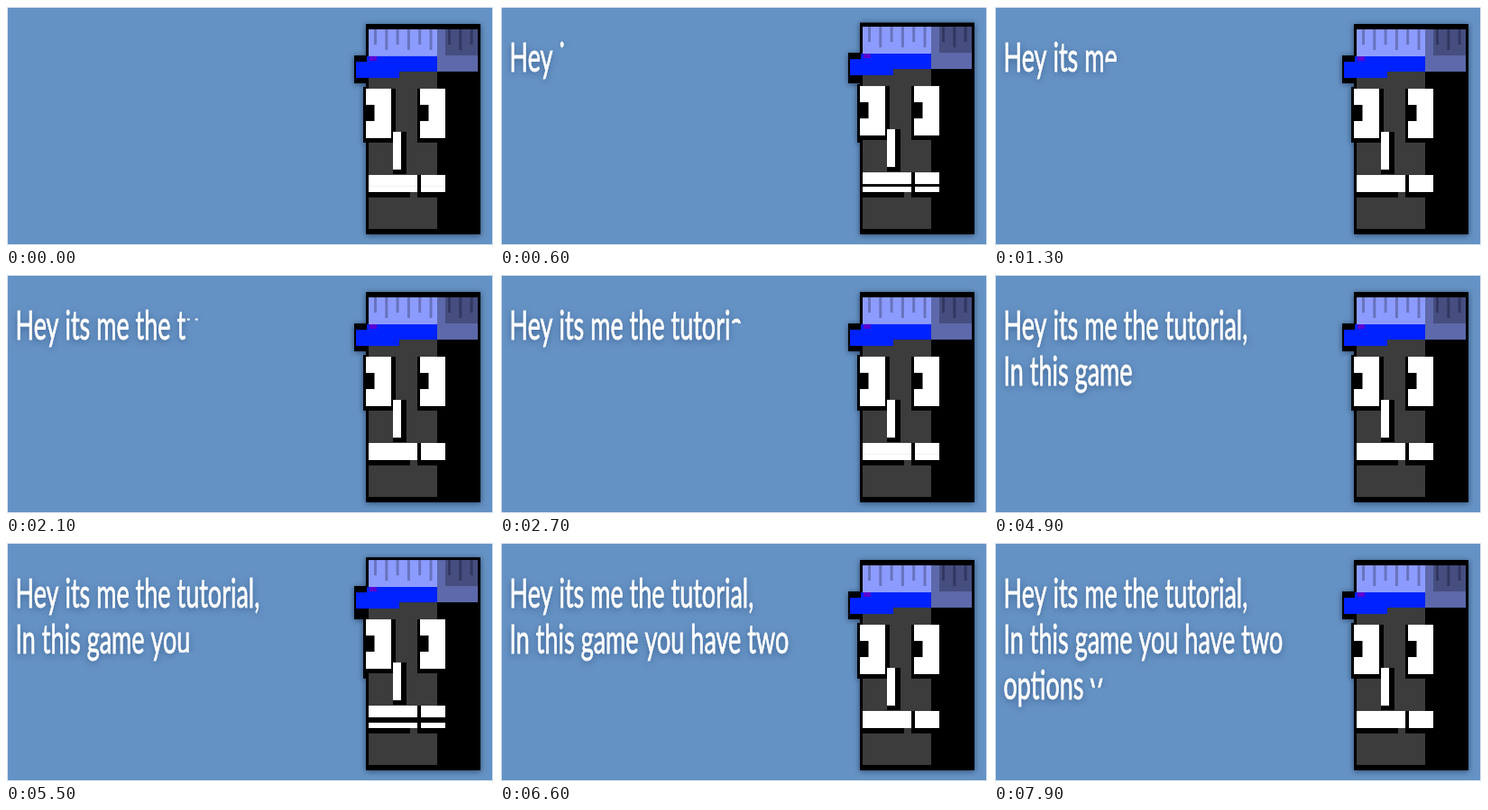
An HTML page with a canvas that plays this animation: 541x267 px, repeating every 8000 ms.

```html
<!DOCTYPE html>
<html>
<head>
<meta charset="utf-8">
<style>
  html, body { margin: 0; width: 100%; height: 100%; overflow: hidden; background: #fff; }
  canvas { display: block; }
</style>
</head>
<body>
<canvas id="stage" width="541" height="267"></canvas>
<script>
const ctx = document.getElementById('stage').getContext('2d');
const LOOP = 8000;
const LINES = ['Hey its me the tutorial,', 'In this game you have two', 'options you'];
const CONDENSE = 0.6;

// [time, letters typed]: speech pauses after the first line
const PACE = [[50, 0], [1300, 9.5], [2700, 21.35], [3100, 24], [3550, 24],
  [4000, 30.3], [5500, 39.7], [6580, 49], [6700, 49], [7900, 57.45], [8000, 58.1]];

function typedAt(t) {
  if (t <= PACE[0][0]) return 0;
  const i = PACE.findIndex(p => p[0] >= t);
  const [t0, n0] = PACE[i - 1], [t1, n1] = PACE[i];
  return n0 + (n1 - n0) * (t - t0) / (t1 - t0);
}

// Mouth opening, 0 to 1, in short beats
function talkAt(t) {
  const phase = t % 450;
  return Math.max(0, 1 - Math.abs(phase - 100) / 100);
}

function box(color, x0, y0, x1, y1) {
  ctx.fillStyle = color;
  ctx.fillRect(x0, y0, x1 - x0, y1 - y0);
}

function shadow(color, blur, dy) {
  ctx.shadowColor = color;
  ctx.shadowBlur = blur;
  ctx.shadowOffsetY = dy;
}

function drawLetters(text, x, y) {
  ctx.save();
  ctx.translate(x, y);
  ctx.scale(CONDENSE, 1);
  ctx.fillStyle = ctx.strokeStyle = '#fff';
  ctx.lineWidth = 0.9;
  shadow('rgba(20,50,95,.55)', 7, 2);
  ctx.fillText(text, 0, 0);
  shadow('transparent', 0, 0);
  ctx.strokeText(text, 0, 0);
  ctx.restore();
}

function drawText(count) {
  ctx.font = '45px Lato, "Open Sans", sans-serif';
  LINES.forEach((line, i) => {
    const x = 10.5, y = 73 + 51 * i;
    const whole = Math.min(line.length, Math.floor(count));
    const part = count - whole;
    if (whole > 0) drawLetters(line.slice(0, whole), x, y);
    if (whole < line.length && part > 0) {
      // the newest letter is wiped in from top to bottom
      const left = x + ctx.measureText(line.slice(0, whole)).width * CONDENSE;
      ctx.save();
      ctx.beginPath();
      ctx.rect(left - 1, y - 35, 45, 48 * part);
      ctx.clip();
      drawLetters(line[whole], left, y);
      ctx.restore();
    }
    count = Math.max(0, count - line.length);
  });
}

function drawEye(x, up) {
  box('#fff', x, 92 - up, x + 28, 147 - up);
  box('#000', x, 110 - up, x + 9.5, 128 - up);
}

function drawHead(open) {
  const up = 6 * open;

  // black silhouette
  ctx.beginPath();
  ctx.rect(399, 20 - up / 2, 127, 234 + up / 2);
  ctx.rect(386, 55 - up, 14, 31 + up);
  ctx.rect(396, 90 - up, 5, 62 + up);
  ctx.fillStyle = '#000';
  shadow('rgba(10,25,50,.6)', 6, 1);
  ctx.fill();
  shadow('transparent', 0, 0);

  box('#3c3c3c', 402, 73 - up, 478, 248);

  // cap
  box('#8c9bff', 402, 26 - up, 478, 56 - up);
  box('#5d69aa', 478, 26 - up, 523, 73 - up);
  box('#464e80', 487, 26 - up, 523, 55 - up);
  for (let i = 0; i < 6; i++)
    box('#6873bd', 408 + 12.3 * i, 26 - up, 411 + 12.3 * i, (i % 2 ? 49 : 43) - up);
  for (let i = 0; i < 3; i++)
    box('#323860', 490 + 12.3 * i, 26 - up, 493 + 12.3 * i, (i % 2 ? 49 : 43) - up);
  box('#000', 399, 80 - up, 402, 86 - up);
  box('#0022ff', 400, 56 - up, 478, 73 - up);
  box('#0022ff', 388, 62 - up, 436, 80 - up);
  box('#5a00d2', 403, 56 - up, 411, 61 - up);

  // eyes and nose
  box('#000', 396, 92 - up, 432, 152 - up);
  box('#000', 456, 92 - up, 487, 152 - up);
  drawEye(399, up);
  drawEye(459, up);
  box('#000', 429, 140 - up, 444, 187 - up);
  box('#fff', 429, 140 - up, 438, 182 - up);

  // mouth
  box('#000', 402, 188 - up, 487, 213);
  box('#3c3c3c', 448, 207, 456, 213);
  for (const [a, b] of [[402, 456], [460, 487]]) {
    box('#fff', a, 188 - up, b, 201 - up);
    box('#fff', a, 201, b, 207);
  }
  if (up < 0.01) box('#fff', 402, 200, 456, 202);
}

function frame(now) {
  const t = now % LOOP;
  box('#fff', 0, 0, 541, 267);
  box('#dce7f2', 1, 1, 540, 266);
  box('#6592c4', 2, 2, 539, 265);
  drawHead(talkAt(t));
  drawText(typedAt(t));
  requestAnimationFrame(frame);
}
requestAnimationFrame(frame);
</script>
</body>
</html>
```
